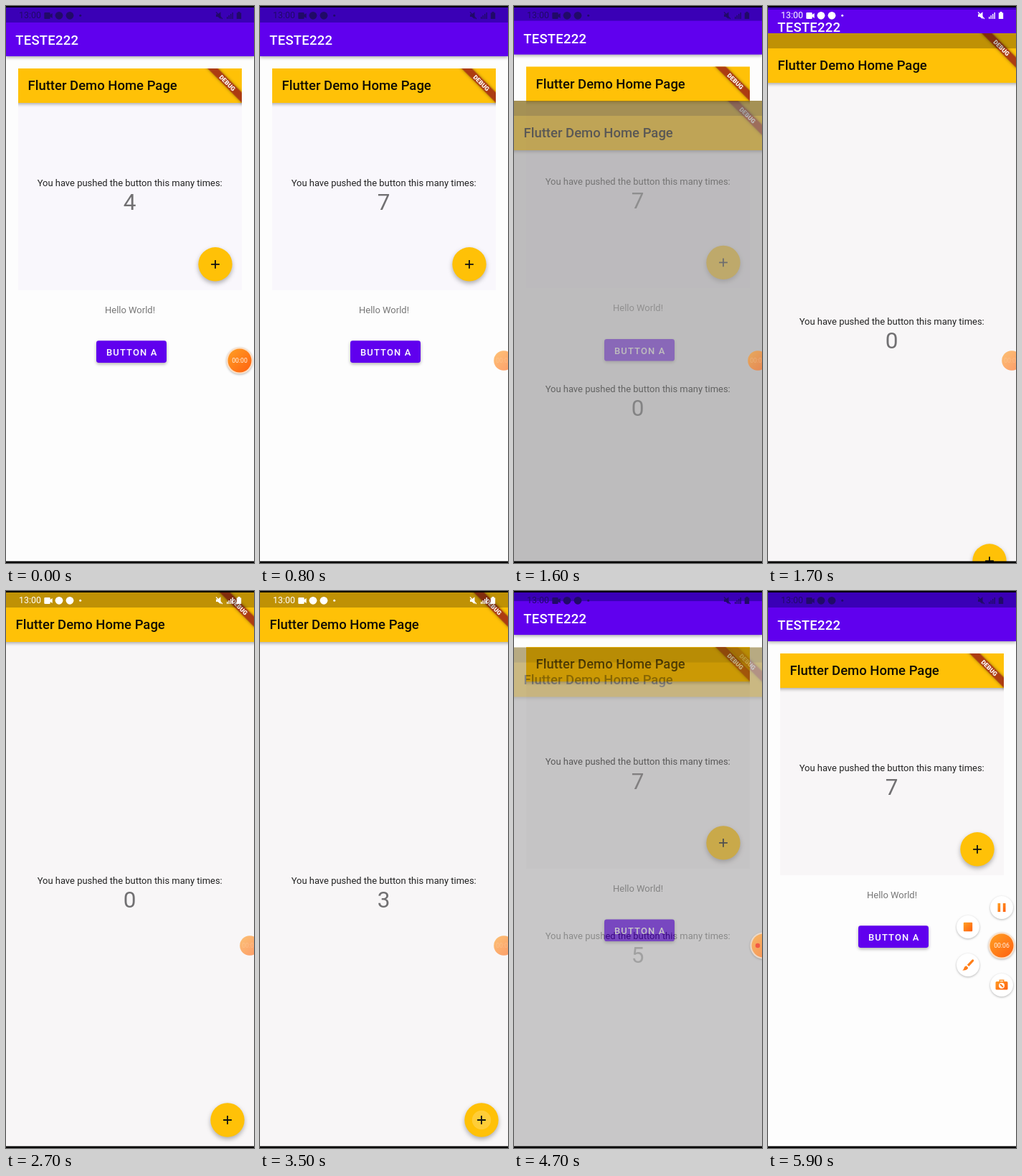
An HTML page that plays this animation: 346x776 px, repeating every 6200 ms.

```html
<!DOCTYPE html>
<html lang="en">
<head>
<meta charset="utf-8">
<title>Counter demo</title>
<style>
  html, body { margin: 0; width: 100%; height: 100%; overflow: hidden; background: #fdfdfd; }
  #stage { display: block; width: 100vw; height: 100vh; font-family: Roboto, sans-serif; }
  .title { font-size: 18.5px; font-weight: 500; }
  .body { font-size: 12.97px; text-anchor: middle; }
  .count { font-size: 31.5px; text-anchor: middle; fill: #717072; }
  .lift { filter: drop-shadow(0 2px 2px rgba(0, 0, 0, .3)); }
  .fab { filter: drop-shadow(0 3px 3px rgba(0, 0, 0, .3)); }
  .disc { filter: drop-shadow(0 1px 1.5px rgba(0, 0, 0, .28)); }
</style>
</head>
<body>
<svg id="stage" viewBox="0 0 346 776" preserveAspectRatio="none"></svg>
<script>
const LOOP = 6200, STEP = 100;
const YELLOW = '#ffc107', PURPLE = '#6000ee';

const clamp = v => Math.max(0, Math.min(1, v));
const span = (t, from, to) => clamp((t - from) / (to - from));
const mix = (a, b, p) => a + (b - a) * p;
const easeOut = p => 1 - (1 - p) ** 2;

const banner = right => `
  <g transform="translate(${right} 0) rotate(45)">
    <rect x="-38" y="23.6" width="76" height="10.1" fill="#ac3c12"
      style="filter:drop-shadow(0 0 2px rgba(0,0,0,.4))"/>
    <text y="31.7" font-size="8.6" font-weight="900" text-anchor="middle" fill="#fff">DEBUG</text>
  </g>`;

const fab = (x, y) => `
  <g transform="translate(${x} ${y})">
    <circle class="fab" r="23.7" fill="${YELLOW}"/>
    <circle class="ripple" fill="#fff" opacity="0"/>
    <path d="M-5.9 0H5.9M0-5.9V5.9" stroke="#111" stroke-width="1.8"/>
  </g>`;

// One counter screen; strip is the height of its status bar area.
const counter = o => `
  <svg id="${o.id}" x="${o.x}" y="${o.y}" width="${o.w}" height="${o.h}">
    <rect class="paper" width="${o.w}" height="${o.h}" fill="#f8f6f7"/>
    <rect class="lift" x="-4" y="-4" width="${o.w + 8}" height="${o.strip + 52}" fill="${YELLOW}"/>
    <text class="title" x="13.5" y="${o.strip + 30.3}" fill="#120e04">Flutter Demo Home Page</text>
    <text class="body" x="${172.7 - o.x}" y="${o.textY}" fill="#222">You have pushed the button this many times:</text>
    <text class="count" x="${172.7 - o.x}" y="${o.textY + 33.2}">0</text>
    ${fab(o.fabX, o.fabY)}
    ${banner(o.w)}
    <rect width="${o.w}" height="${o.strip}" opacity=".25"/>
  </svg>`;

const home = `
  <g id="home">
    <rect width="346" height="810" fill="#fdfdfd"/>
    <rect class="lift" y="0" width="346" height="70" fill="${PURPLE}"/>
    <rect width="346" height="23" fill="#3a00b6"/>
    <text class="title" x="13.3" y="54.3" letter-spacing=".23" fill="#fff">TESTE222</text>
    ${counter({ id: 'card', x: 17, y: 87, w: 312, h: 309, strip: 0, textY: 164.2, fabX: 275, fabY: 272.8 })}
    <text class="body" x="173" y="427.5" fill="#777">Hello World!</text>
    <svg x="120" y="460" width="110" height="48">
      <rect class="lift" x="6" y="6.3" width="98" height="30.7" rx="3.4" fill="${PURPLE}"/>
      <rect id="press" x="6" y="6.3" width="98" height="30.7" rx="3.4" fill="#fff" opacity="0"/>
      <text x="20" y="27" font-size="12.97" font-weight="500" letter-spacing="1.16" fill="#fff">BUTTON A</text>
    </svg>
  </g>`;

const detail = `
  <g id="detail">
    <rect id="shade" y="2" width="346" height="774"/>
    <g id="sheet">
      ${counter({ id: 'full', x: 0, y: 2, w: 346, h: 774, strip: 21, textY: 406, fabX: 309, fabY: 735 })}
    </g>
  </g>`;

const status = `
  <g id="status">
    <text x="18" y="17.4" font-size="12.4">13:00</text>
    <path d="M54.5 9h6q1.2 0 1.2 1.2v1.8l3-2v7l-3-2v1.8q0 1.2-1.2 1.2h-6q-1.2 0-1.2-1.2v-6.600q0-1.200 1.200-1.200z"/>
    <circle cx="74" cy="13.3" r="5.4"/>
    <circle cx="89" cy="13.3" r="5.4"/>
    <circle cx="103.700" cy="13.300" r="1.500"/>
    <path d="M293 11.500h2.500l4-3.300v10l-4-3.300h-2.500z"/>
    <path d="M293 8.500l9 9.500" stroke="currentColor" stroke-width="1.100"/>
    <path d="M308 15h1.400v3h-1.400zM310.500 13h1.400v5h-1.400zM313 11h1.400v7h-1.400zM315.500 9h1.400v9h-1.400z"/>
    <path d="M323.500 8h3v1.500h1.700v8.500h-6.400v-8.500h1.700z"/>
  </g>`;

const tools = [
  [326, 441, '<path d="M-5.500-6h3.700v12h-3.700zM1.800-6h3.700v12h-3.700z"/>'],
  [279, 468, '<rect x="-6.200" y="-6.200" width="12.400" height="12.400" rx="1"/>'],
  [279, 521, '<path d="M7.500-7.500q1.500 1 .3 2.500l-6.500 7-2.500-2.300 6.700-7q1-1 2-.2zM-2.300 1.200l2.500 2.500q-1.200 4.300-8 3.700 2.200-1.200 2.300-3.300 1-2.700 3.200-2.900z"/>'],
  [326, 549, `<path fill-rule="evenodd" d="M-3.500-7.500h7v2.500h3.500q1.500 0 1.500 1.500v8.500q0 1.500-1.500 1.500h-14q-1.500 0-1.500-1.500v-8.500q0-1.500 1.500-1.500h3.500zM-2-6v1h4v-1z"/>
    <circle cy=".8" r="4" fill="#fff"/><path d="M-2-1.200L2 2.800" stroke="#ff7a1c" stroke-width="2"/>`]
];

const bubble = `
  <g id="menu">${tools.map(([, , icon]) => `
    <g class="tool" fill="url(#orange)"><circle class="disc" r="16" fill="#fff"/>${icon}</g>`).join('')}
  </g>
  <g id="bubble">
    <circle id="ring" r="18.600" fill="#fbe0c8" class="disc"/>
    <circle id="ball" fill="url(#orange)"/>
    <circle id="dot" cx="-8" r="3.200" fill="#f25a45"/>
    <text id="timer" y="3.100" font-size="8.700" text-anchor="middle" fill="#fff3e6"></text>
  </g>`;

const stage = document.getElementById('stage');
stage.innerHTML = `
  <defs>
    <linearGradient id="orange" x1="0" y1="0" x2="1" y2="1">
      <stop offset="0" stop-color="#ffa024"/><stop offset="1" stop-color="#ff6010"/>
    </linearGradient>
  </defs>
  ${home}${detail}${status}${bubble}
  <path d="M0 0H346V2H0zM0 773.500H346V776H0z"/>`;

const el = id => document.getElementById(id);
const set = (node, attrs) => {
  for (const key in attrs) node.setAttribute(key, attrs[key]);
};
const move = (node, x, y, scale = 1) => set(node, { transform: `translate(${x} ${y}) scale(${scale})` });

const cardTaps = [200, 400, 600];
const fullTaps = [3300, 3400, 3500, 3600, 3700];

function drawCount(id, start, taps, t) {
  const done = taps.filter(tap => tap <= t);
  const age = done.length ? span(t, done[done.length - 1] - 100, done[done.length - 1] + 200) : 1;
  el(id).querySelector('.count').textContent = start + done.length;
  set(el(id).querySelector('.ripple'), { r: mix(8, 23.6, age), opacity: 0.3 * (1 - age) });
}

function drawPages(t) {
  const opening = t < 4000;
  const leave = span(t, 4450, 4800);
  const alpha = opening ? span(t, 1530, 1695) : 1 - leave;
  const drop = opening ? 130 * Math.exp((1600 - t) / 78) : 150 * leave * leave;
  const lift = opening ? 2.4 + 0.156 * (t - 1600) : 20 * (1 - span(t, 4450, 4900));

  move(el('home'), 0, -Math.max(0, Math.min(24, lift)));
  move(el('detail'), 0, drop < 0.3 ? 0 : drop);
  set(el('detail'), { display: alpha > 0 ? 'inline' : 'none' });
  set(el('shade'), { opacity: alpha });
  set(el('sheet'), { opacity: alpha });
  set(el('press'), { opacity: 0.24 * span(t, 1100, 1300) * (1 - span(t, 1300, 1600)) });
  set(el('card').querySelector('.paper'), { fill: t < 2000 ? '#f9f7fc' : '#f8f6f7' });

  const tint = t >= 1700 && t < 4700 ? '#fff' : '#210a68';
  set(el('status'), { fill: tint, color: tint });
}

function drawBubble(t) {
  const touched = t >= 4300 && t < 5400;
  const hide = t < 5400 ? easeOut(span(t, 300, 800)) : 0;
  move(el('bubble'), touched ? 348 : mix(326, 340, hide), 494);
  set(el('ball'), { r: touched ? 16.5 : mix(16.5, 13.8, hide), opacity: mix(1, 0.62, hide) });
  set(el('ring'), { opacity: touched ? 0.7 : 1 - hide });
  set(el('dot'), { opacity: touched ? 1 : 0 });
  set(el('timer'), { opacity: touched ? 0 : mix(1, 0.22, hide) });
  el('timer').textContent = '00:0' + Math.floor((t + 100) / 1000);

  const open = easeOut(span(t, 5540, 5700));
  set(el('menu'), { opacity: open });
  document.querySelectorAll('.tool').forEach((tool, i) => {
    const [x, y] = tools[i];
    move(tool, mix(326, x, open), mix(494, y, open), mix(0.5, 1, open));
  });
}

function draw(ms) {
  const t = Math.floor((ms % LOOP) / STEP) * STEP;
  drawCount('card', 4, cardTaps, t);
  drawCount('full', 0, fullTaps, t);
  drawPages(t);
  drawBubble(t);
}

const begin = performance.now();
function tick() {
  draw(performance.now() - begin);
  requestAnimationFrame(tick);
}
tick();
</script>
</body>
</html>
```
